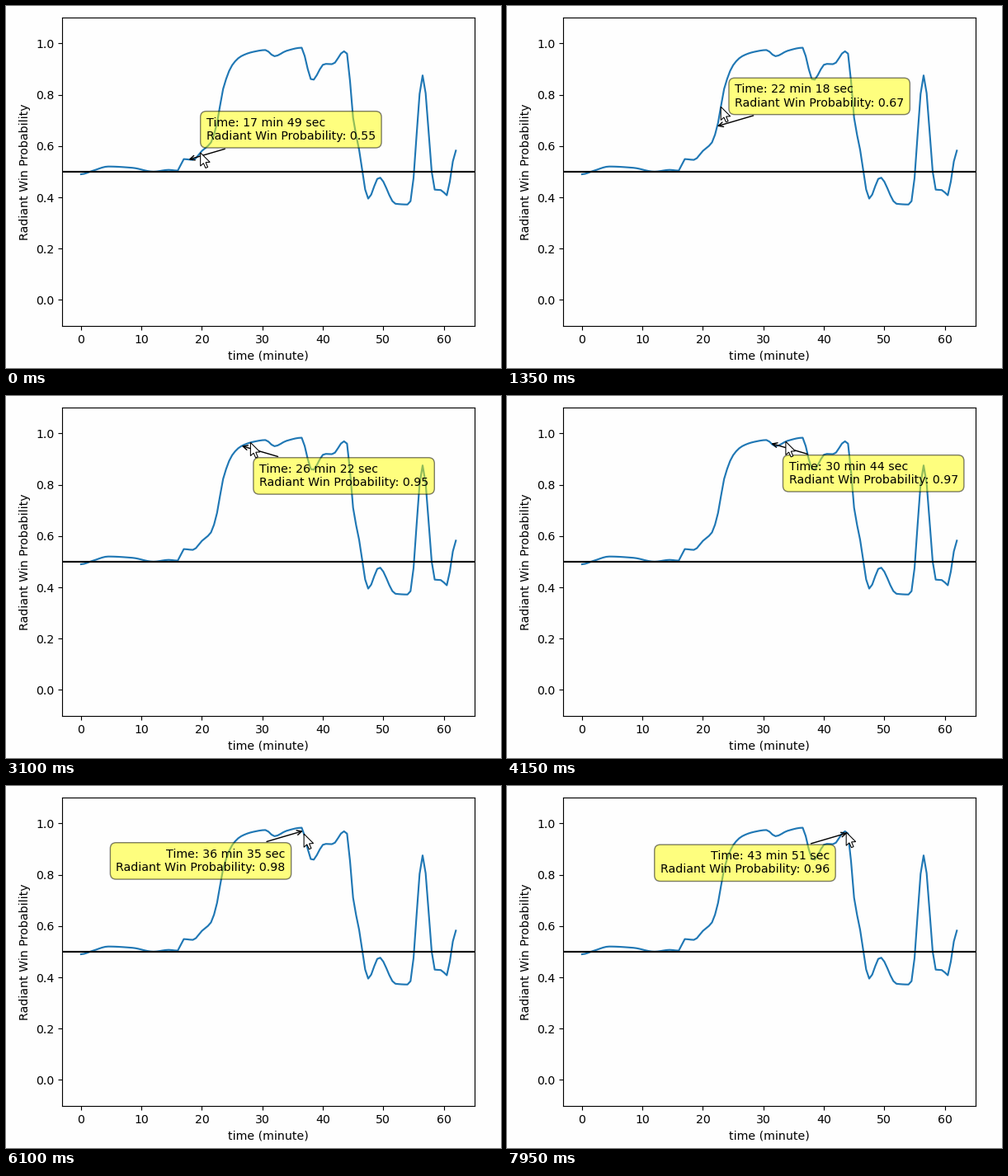
Animation, 600 px wide and 439 px high, one loop 8 s. Source, as a matplotlib script:

```python
import matplotlib.pyplot as plt
import numpy as np
from matplotlib.animation import FuncAnimation
from matplotlib.patches import Polygon

W, H, DPI = 600, 439, 102
STEP, LOOP = 50, 8000

plt.rcParams.update({"font.family": "DejaVu Sans", "font.size": 10,
                     "toolbar": "None"})

# Turning points of the win probability: minute, value
knots = np.array([
    (0, .490), (2, .504), (4.5, .520), (8.5, .515), (12, .500), (14.5, .507),
    (16, .504), (17, .549), (18.5, .546), (20, .581), (21.5, .614),
    (22.5, .690), (23.5, .822), (25, .915), (26.5, .950), (28.5, .967),
    (30.5, .974), (32, .950), (34, .971), (36.5, .983), (37.5, .900),
    (38.2, .855), (40.3, .920), (41.6, .919), (43.5, .969), (44, .960),
    (45, .710), (46, .585), (47.5, .395), (49.3, .478), (52, .375),
    (54, .372), (54.5, .385), (56.5, .875), (58.5, .430), (59.6, .428),
    (60.5, .408), (61.5, .540), (62, .582)])

# ms, minute of the note, minute under the mouse
path = np.array([
    (0, 17.82, 19.75), (850, 20.4, 21.3), (1300, 22.31, 22.9),
    (2300, 23.29, 24.2), (2550, 23.42, 24.4), (2600, 24.5, 25.3),
    (4100, 30.74, 33.5), (4150, 31.3, 33.7), (5250, 33.2, 34.6),
    (5400, 33.2, 34.6), (5550, 33.2, 36.4), (5600, 36.4, 36.5),
    (6050, 36.59, 36.6), (7050, 38.7, 42.0), (7100, 41.77, 43.5),
    (7150, 41.95, 43.85), (7900, 43.86, 43.7)])

pointer_shape = np.array([(0, 0), (0, -16.2), (3.7, -12.8), (6.3, -18.6),
                          (8.9, -17.5), (6.4, -11.8), (11.5, -11.5)])


def smooth(x, t, v):
    """Monotone cubic through the points (t, v)."""
    h = np.diff(t)
    s = np.diff(v) / h
    a, b = s[:-1], s[1:]
    m = np.zeros_like(v)
    same = a * b > 0
    m[1:-1][same] = (2 * a * b)[same] / (a + b)[same]
    i = np.clip(np.searchsorted(t, x, side="right") - 1, 0, len(h) - 1)
    u = (x - t[i]) / h[i]
    ease = u * u * (3 - 2 * u)
    return (v[i] + (v[i + 1] - v[i]) * ease
            + h[i] * u * (1 - u) * (m[i] * (1 - u) - m[i + 1] * u))


minutes = np.arange(0, 62.5, 0.5)
prob = smooth(minutes, *knots.T)


def win_prob(t):
    return np.interp(t, minutes, prob)


def hovered(ms):
    return np.interp(ms, path[:, 0], path[:, 1])


fig = plt.figure(figsize=((W + 0.01) / DPI, (H + 0.01) / DPI), dpi=DPI,
                 facecolor="#fefefe")
left, right, top, bottom = 68.2, 568, 14.2, 387.6
ax = fig.add_axes([left / W, 1 - bottom / H, (right - left) / W,
                   (bottom - top) / H], facecolor="#fefefe")
ax.plot(minutes, prob, color="#1f77b4", lw=1.5)
ax.axhline(0.5, color="black", lw=1.5, zorder=2.1)
ax.set(xlim=(-3.1, 65.1), ylim=(-0.1, 1.1),
       xlabel="time (minute)", ylabel="Radiant Win Probability")

note = ax.annotate(
    "", xy=(0, 0), xytext=(15, 15), textcoords="offset points", zorder=5,
    bbox=dict(boxstyle="round,pad=.5", fc="yellow", ec="k", alpha=0.5),
    arrowprops=dict(arrowstyle="->", connectionstyle="arc3", shrinkB=0,
                    ec="k"))
pointer = Polygon(pointer_shape, closed=True, fc="white", ec="black",
                  lw=0.75, transform=fig.transFigure, zorder=10)
fig.add_artist(pointer)


def place_note(t, label_t):
    """Keep the box inside the axes: flip it left or below when needed."""
    value = win_prob(t)
    flip = t > 33.3
    below = flip or value > 0.913
    note.xy = (t, value)
    note.set_position((-15 if flip else 15, -15 if below else 15))
    note.set_ha("right" if flip else "left")
    note.set_va("top" if below else "bottom")
    whole = int(label_t)
    note.set_text(f"Time: {whole} min {int((label_t - whole) * 60)} sec\n"
                  f"Radiant Win Probability: {win_prob(label_t):.2f}")


def place_pointer(t):
    tip = ax.transData.transform((t, win_prob(t)))
    pointer.set_xy(fig.transFigure.inverted().transform(pointer_shape + tip))


def update(frame):
    ms = frame * STEP
    # the label trails the arrow by one step
    place_note(hovered(ms), hovered(ms - STEP))
    place_pointer(np.interp(ms, path[:, 0], path[:, 2]))
    return note, pointer


anim = FuncAnimation(fig, update, frames=LOOP // STEP, interval=STEP,
                     repeat=True, repeat_delay=0, blit=False)
plt.show()
```
